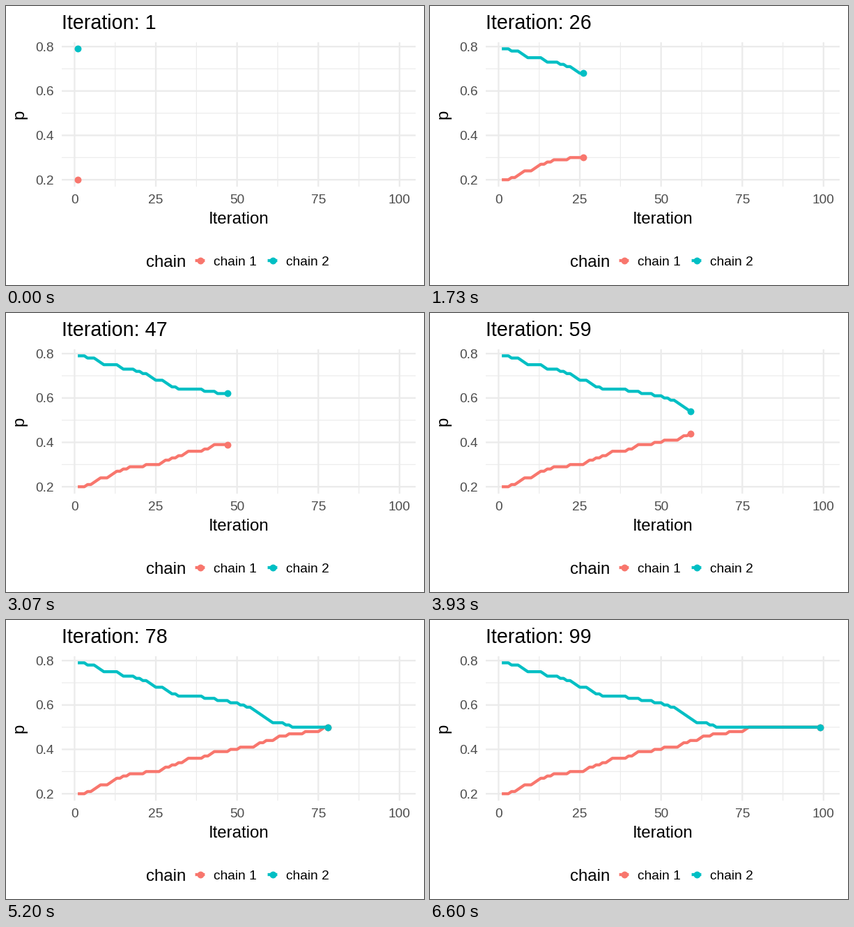
These frames come from a looping animation (600x400 px, 6670 ms). A matplotlib script:

```python
import numpy as np
import matplotlib.pyplot as plt
from matplotlib.animation import FuncAnimation

plt.rcParams["font.family"] = "Liberation Sans"

W, H, DPI = 600, 400, 100
PX = 72 / DPI  # points per pixel
LEFT, RIGHT, TOP, BOTTOM = 80, 588, 52, 258.5
N = 100
GRID, GREY = "#EBEBEB", "#4D4D4D"
COLORS = ["#F8766D", "#00BFC4"]
LINE, DOT = 4.27 * PX, (9.9 * PX) ** 2

# Iterations at which each chain moves by 0.01
RISES = [4, 6, 7, 8, 11, 12, 13, 15, 17, 22, 27, 28, 30, 32, 34, 35, 40, 42,
         43, 48, 51, 56, 57, 59, 62, 63, 66, 71, 76, 77]
FALLS = [4, 7, 8, 9, 14, 15, 19, 21, 23, 24, 25, 28, 29, 30, 32, 40, 44, 48,
         51, 53, 55, 56, 57, 58, 59, 60, 61, 65, 67]

its = np.arange(1, N + 1)
chains = [0.20 + 0.01 * np.searchsorted(RISES, its, side="right"),
          0.79 - 0.01 * np.searchsorted(FALLS, its, side="right")]

fig = plt.figure(figsize=(W / DPI, H / DPI), dpi=DPI, facecolor="white")

# Stage in pixels, for text and legend
stage = fig.add_axes([0, 0, 1, 1])
stage.set(xlim=(0, W), ylim=(H, 0))
stage.axis("off")

panel = fig.add_axes([LEFT / W, 1 - BOTTOM / H,
                      (RIGHT - LEFT) / W, (BOTTOM - TOP) / H])
panel.set(xlim=(-3.95, 104.95), ylim=(0.1705, 0.8195))
panel.axis("off")


def label(x, y, s, size, color="black", **kw):
    kw = {"ha": "left", "va": "baseline", **kw}
    return stage.text(x, y, s, fontsize=size * PX, color=color, **kw)


def grid(xs, ys, width, z):
    style = dict(color=GRID, lw=width * PX, snap=False, zorder=z)
    for y in ys:
        panel.axhline(y, **style)
    for x in xs:
        panel.axvline(x, **style)


grid([12.5, 37.5, 62.5, 87.5], [0.3, 0.5, 0.7], 1.16, 0)
grid([0, 25, 50, 75, 100], [0.2, 0.4, 0.6, 0.8], 2.33, 1)

for v in (0, 25, 50, 75, 100):
    x = LEFT + (v + 3.95) * (RIGHT - LEFT) / 108.9
    label(x, 283, str(v), 19.2, GREY, ha="center")
for v in (0.2, 0.4, 0.6, 0.8):
    y = BOTTOM - (v - 0.1705) * (BOTTOM - TOP) / 0.649
    label(42, round(y + 6.6), f"{v:.1f}", 19.2, GREY)

title = label(80, 33, "", 28.8)
label(291, 312, "Iteration", 24)
label(26, 155.3, "p", 24, rotation=90, ha="right", va="center",
      rotation_mode="default").set_x(30)

label(201, 374, "chain", 24)
for i, color in enumerate(COLORS):
    x = 278.5 + 104 * i
    stage.plot([x - 6.9, x + 6.9], [365, 365], color=color, lw=LINE,
               solid_capstyle="butt", snap=False)
    stage.scatter([x], [365], s=DOT, color=color, lw=0, snap=False, zorder=3)
    label(x + 19.7, 372, f"chain {i + 1}", 19.2)

lines = [panel.plot([], [], color=c, lw=LINE, solid_capstyle="butt",
                    solid_joinstyle="round", snap=False, zorder=3)[0]
         for c in COLORS]
dots = [panel.scatter([1], [p[0]], s=DOT, color=c, lw=0, snap=False, zorder=4)
        for p, c in zip(chains, COLORS)]


def draw(k):
    n = k + 1
    title.set_text(f"Iteration: {n}")
    for p, line, dot in zip(chains, lines, dots):
        shown = n if n > 1 else 0
        line.set_data(its[:shown], p[:shown])
        dot.set_offsets([[n, p[k]]])
    return [title, *lines, *dots]


anim = FuncAnimation(fig, draw, frames=N, interval=66.7, repeat=True,
                     repeat_delay=0)
plt.show()
```
